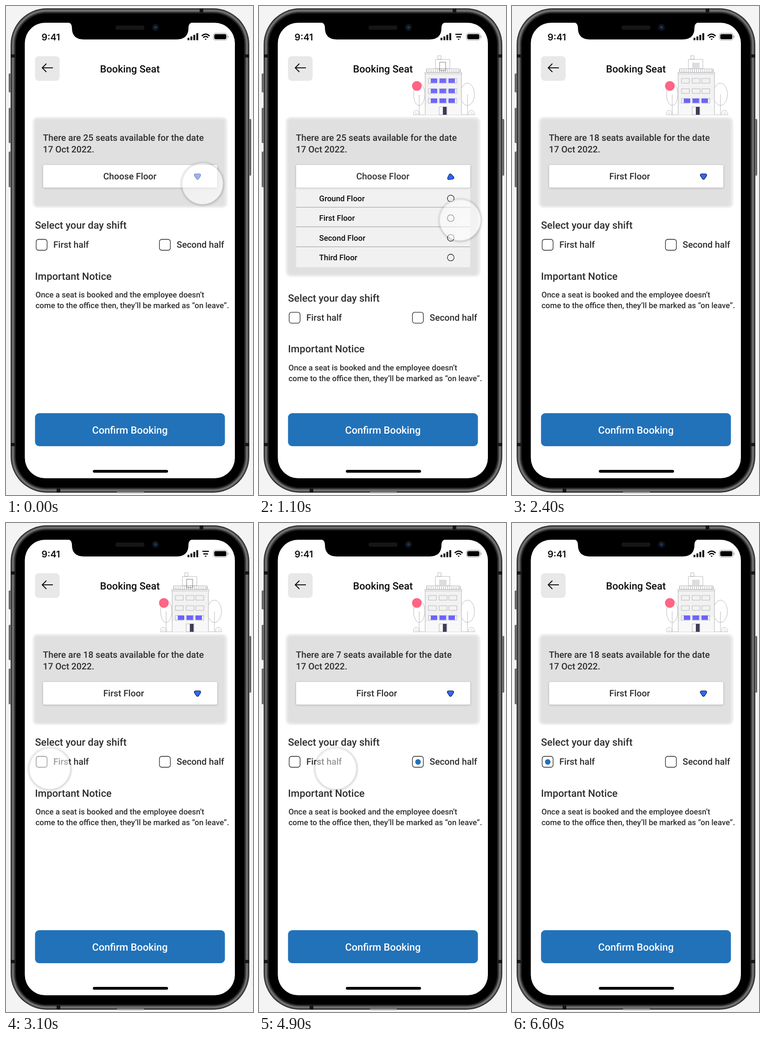
An HTML page for the animation above (6790 ms loop, 532 by 1052 pixels).

```html
<!DOCTYPE html>
<html lang="en">
<head>
<meta charset="utf-8">
<title>Booking Seat</title>
<style>
  html, body { margin: 0; width: 100%; height: 100%; overflow: hidden; background: #f4f4f4; }
  svg { display: block; width: 100vw; height: 100vh; }
  text { font-family: Roboto, sans-serif; font-weight: 500; font-size: 19.3px; fill: #302c30; white-space: pre; text-rendering: geometricPrecision; }
  .head { font-size: 21.7px; }
  .small { font-size: 16.9px; }
  .ink { fill: #0c0c0c; }
  .line { fill: none; stroke: #222; stroke-width: 1.3; }
  .thin { fill: none; stroke: #a5a5ac; stroke-width: .8; }
</style>
</head>
<body>
<svg viewBox="0 0 532 1052" preserveAspectRatio="none">
  <defs>
    <linearGradient id="key" x2="1">
      <stop offset="0" stop-color="#333"/><stop offset=".5" stop-color="#999"/><stop offset="1" stop-color="#333"/>
    </linearGradient>
    <linearGradient id="glass" x2="1" y2="1">
      <stop offset="0" stop-color="#fff" stop-opacity=".42"/><stop offset="1" stop-color="#fff" stop-opacity=".65"/>
    </linearGradient>
    <radialGradient id="halo">
      <stop offset=".85" stop-opacity="0"/><stop offset=".88" stop-opacity=".15"/><stop offset="1" stop-opacity="0"/>
    </radialGradient>
    <filter id="soft" x="-5%" y="-5%" width="110%" height="110%"><feGaussianBlur stdDeviation="1.5"/></filter>
    <filter id="lift" x="-5%" y="-20%" width="110%" height="150%">
      <feDropShadow dx="0" dy="1" stdDeviation="2" flood-opacity=".25"/>
    </filter>
    <clipPath id="screen"><rect x="40.500" y="36" width="452.500" height="980" rx="44"/></clipPath>
    <clipPath id="cardClip"><rect id="cardClipBox" x="59" y="390" width="416"/></clipPath>
  </defs>

  <!-- phone body -->
  <rect width="532" height="1052" fill="#f4f4f4"/>
  <g fill="url(#key)">
    <rect x="6" y="145" width="7" height="41" rx="2"/>
    <rect x="6" y="219" width="7" height="76" rx="2"/>
    <rect x="6" y="313" width="7" height="77" rx="2"/>
    <rect x="521" y="243" width="7" height="122" rx="2"/>
  </g>
  <rect x="10" y="5" width="514" height="1042" rx="78" fill="#232323"/>
  <g fill="none">
    <rect x="15" y="10" width="504" height="1032" rx="73" stroke="#4e4e4e" stroke-width="7"/>
    <rect x="15" y="10" width="504" height="1032" rx="73" stroke="#747474" stroke-width="3"/>
  </g>
  <g fill="#161616">
    <rect x="417" y="5" width="8" height="9"/><rect x="109" y="1038" width="8" height="9"/>
    <rect x="10" y="104" width="10" height="7"/><rect x="514" y="104" width="10" height="7"/>
    <rect x="10" y="940" width="10" height="7"/><rect x="514" y="940" width="10" height="7"/>
  </g>
  <rect x="21" y="16" width="492" height="1020" rx="67"/>
  <rect x="239" y="1045" width="58" height="3" rx="1" fill="#999"/>
  <rect x="40.500" y="36" width="452.500" height="980" rx="44" fill="#fff"/>

  <g clip-path="url(#screen)">
    <rect x="62.500" y="108" width="53" height="53" rx="8" fill="#e8e8e8"/>
    <path d="M101 133H78M87 124l-9 9 9 9" fill="none" stroke="#111" stroke-width="2"/>
    <g id="building">
      <ellipse class="thin" cx="345" cy="190" rx="12" ry="24"/>
      <ellipse class="thin" cx="449" cy="190" rx="15" ry="24"/>
      <path class="thin" d="M345 190V234M449 190V234M332 234H466M333 233a6 6 0 1 1 11 0M452 233a6 6 0 1 1 11 0M336 229l4 3M456 229l4 3"/>
      <circle cx="340" cy="172" r="10.500" fill="#ff6584"/>
      <path d="M357 146H437V234H357z" fill="#f2f2f2"/>
      <path d="M357 212L437 202V234H357z" fill="#f8f8f8"/>
      <path class="thin" d="M357 143H437V146H357zM358 146V234M436 146V234M361 135H432V143H361zM380 115H411V135H380zM385 107H392V115H385z"/>
      <path d="M361 139.500H436" stroke="#aaa" stroke-width="7" stroke-dasharray="1 3.500" fill="none"/>
      <rect id="attic" x="388" y="122" width="16" height="13" fill="#ddd"/>
      <rect id="atticFrame" class="thin" x="389" y="121" width="13" height="18" style="stroke:#555"/>
      <g id="frames" class="thin"></g>
      <g id="upperLights" fill="#6c63ff"></g>
      <g id="lowerLights" fill="#6c63ff"></g>
      <rect class="thin" x="388" y="217" width="17" height="17"/>
      <rect id="door" x="396" y="217" width="8" height="17" fill="#3f3d56"/>
    </g>
    <text class="head ink" x="202.500" y="143">Booking Seat</text>

    <!-- seat card -->
    <rect id="cardEdge" x="57.500" y="239" width="419" fill="#ebebeb" rx="10" filter="url(#soft)"/>
    <rect id="card" x="62" y="243" width="409" fill="#e0e0e0" rx="7" filter="url(#soft)"/>
    <text x="79.500" y="290">There are <tspan id="count">25</tspan> seats available for the date</text>
    <text x="79.500" y="315">17 Oct 2022.</text>
    <g clip-path="url(#cardClip)">
      <g id="rows">
        <rect x="80" y="380" width="375" height="182" rx="3" fill="#f1f1f1"/>
        <path d="M80 433H455M80 475H455M80 518H455" stroke="#b4b4b4" stroke-width="1.300"/>
      </g>
    </g>
    <rect x="80" y="342" width="375" height="48.500" rx="3" fill="#fff" filter="url(#lift)"/>
    <text id="choose" x="209.500" y="372.500">Choose Floor</text>
    <text id="chosen" x="209.500" y="373">First Floor</text>
    <g id="arrow" fill="#2f68ff" stroke-linejoin="round">
      <path d="M408.500 364H416.500L412.500 370z" stroke="#16234f" stroke-width="7"/>
      <path d="M408.500 364H416.500L412.500 370z" stroke="#2f68ff" stroke-width="4.500"/>
    </g>

    <g id="below">
      <text class="head" x="62.500" y="479">Select your day shift</text>
      <rect class="line" x="65" y="502" width="23.500" height="23.500" rx="5"/>
      <rect class="line" x="330.500" y="502" width="23.500" height="23.500" rx="5"/>
      <circle id="dotFirst" cx="77" cy="514" r="6" fill="#2272b9"/>
      <circle id="dotSecond" cx="342.500" cy="514" r="6" fill="#2272b9"/>
      <text x="102" y="520">First half</text>
      <text x="367.500" y="520">Second half</text>
      <text class="head" x="62.500" y="588.500">Important Notice</text>
      <text class="small" x="63.500" y="627">Once a seat is booked and the employee doesn’t</text>
      <text class="small" x="63.500" y="650">come to the office then, they’ll be marked as “on leave”.</text>
    </g>
    <rect x="62.500" y="876" width="409" height="71" rx="9" fill="#2272b9"/>
    <text class="head" x="185.500" y="919.500" style="fill:#fff">Confirm Booking</text>
    <rect x="187" y="998" width="162" height="6" rx="3"/>

    <!-- status bar -->
    <path d="M130 35Q142 35 142 47Q142 72 168 72H367Q393 72 393 47Q393 35 405 35z"/>
    <rect x="236" y="42" width="62" height="9" rx="4" fill="#161617"/>
    <circle cx="322" cy="46" r="7.500" fill="#10131b"/>
    <circle cx="322" cy="46" r="3" fill="#1a3663"/>
    <text x="76.500" y="74" class="ink" style="font:600 19.800px Inter, sans-serif">9:41</text>
    <path d="M393 68.500V73.500M399.300 65.500V73.500M405.600 62V73.500M412 58.500V73.500" stroke="#000" stroke-width="4"/>
    <g fill="none" stroke="#000" stroke-width="2.600">
      <path id="wifiTop" d="M421.500 64.500Q430 56.500 438.500 64.500"/>
      <path id="wifiMid" d="M424.700 68Q430 63 435.300 68"/>
      <path id="wifiFlat" d="M423 61H437M425 66.500H435"/>
      <path d="M427.500 70.500h5l-2.500 2.800z" fill="#000" stroke="none"/>
    </g>
    <rect x="446.500" y="58.500" width="30" height="15" rx="4.500" fill="none" stroke="#999"/>
    <rect x="448.500" y="60.500" width="26" height="11" rx="3"/>
    <path d="M478.500 64v4" stroke="#999" stroke-width="1.500"/>

    <g id="pointer">
      <circle cx=".5" cy="1" r="50" fill="url(#halo)"/>
      <circle r="44" fill="url(#glass)" stroke="#fff" stroke-opacity=".5"/>
    </g>
  </g>
</svg>
<script>
const LOOP = 6790, STEP = 100, TEXT_DROP = 164, CARD_DROP = 155;
const $ = id => document.getElementById(id);
const set = (id, name, value) => $(id).setAttribute(name, value);
const show = (id, amount) => set(id, 'opacity', amount);

const add = (parent, tag, attrs, text = '') => {
  const node = document.createElementNS('http://www.w3.org/2000/svg', tag);
  for (const name in attrs) node.setAttribute(name, attrs[name]);
  node.textContent = text;
  $(parent).append(node);
};

[156, 178, 199].forEach((y, floor) => {
  [[365, 370], [388, 389], [409, 408]].forEach(([frameX, lightX]) => {
    add('frames', 'rect', { x: frameX, y, width: 17, height: 10 });
    add(floor < 2 ? 'upperLights' : 'lowerLights', 'rect', { x: lightX, y, width: 14, height: 9.5 });
  });
});

['Ground', 'First', 'Second', 'Third'].forEach((name, i) => {
  const y = 414 + 42.4 * i;
  add('rows', 'text', { x: 129.5, y: y + 5.8, class: 'small ink' }, name + ' Floor');
  add('rows', 'circle', { cx: 413, cy: y, r: 7.2, class: 'line' });
});

const ramp = (t, from, to) => Math.min(1, Math.max(0, (t - from) / (to - from)));
const quad = u => u < .5 ? 2 * u * u : 1 - 2 * (1 - u) ** 2;
const cubic = u => u < .5 ? 4 * u ** 3 : 1 - 4 * (1 - u) ** 3;

const transitions = [[100, 450], [1000, 1450], [1800, 2000], [3000, 3500], [4200, 4600], [5700, 6100]];

function pointerAt(t) {
  if (t < 2000) {
    const u = quad(ramp(t, 120, 630));
    return [423 + 10 * u, 382 + 78 * u];
  }
  const across = quad(ramp(t, 3500, 4150)) - quad(ramp(t, 4380, 5200));
  return [94 + 266 * across, 528];
}

function draw(t) {
  const open = cubic(ramp(t, 100, 450)) - cubic(ramp(t, 1000, 1450));
  const grow = CARD_DROP * open;
  set('card', 'height', 187 + grow);
  set('cardEdge', 'height', 195 + grow);
  set('cardClipBox', 'height', 42 + grow);
  set('below', 'transform', `translate(0 ${TEXT_DROP * open})`);
  set('arrow', 'transform', `rotate(${180 * open} 412.5 367)`);
  show('rows', Math.min(1, open * 1.5));

  const picked = cubic(ramp(t, 1000, 1450));
  show('choose', 1 - picked);
  show('chosen', picked);
  show('upperLights', 1 - picked);
  show('building', ramp(t, 100, 400));

  const toFirst = cubic(ramp(t, 3000, 3450));
  const toSecond = cubic(ramp(t, 4200, 4600));
  const back = cubic(ramp(t, 5700, 6100));
  show('dotFirst', toFirst - toSecond + back);
  show('dotSecond', toSecond - back);
  $('count').textContent = t < 1900 ? 25 : t < 4400 || t >= 5900 ? 18 : 7;

  const moving = transitions.some(([from, to]) => t >= from && t < to);
  for (const id of ['wifiTop', 'wifiMid', 'attic']) show(id, moving ? 0 : 1);
  for (const id of ['wifiFlat', 'atticFrame']) show(id, moving ? 1 : 0);

  const [x, y] = pointerAt(t);
  set('pointer', 'transform', `translate(${x} ${y})`);
  show('pointer', 1 - ramp(t, 1300, 1500) + ramp(t, 2400, 2700) - ramp(t, 6000, 6250));
}

const start = performance.now();
function tick() {
  const t = (performance.now() - start) % LOOP;
  draw(Math.min(6600, Math.floor(t / STEP) * STEP));
  requestAnimationFrame(tick);
}
tick();
</script>
</body>
</html>
```
